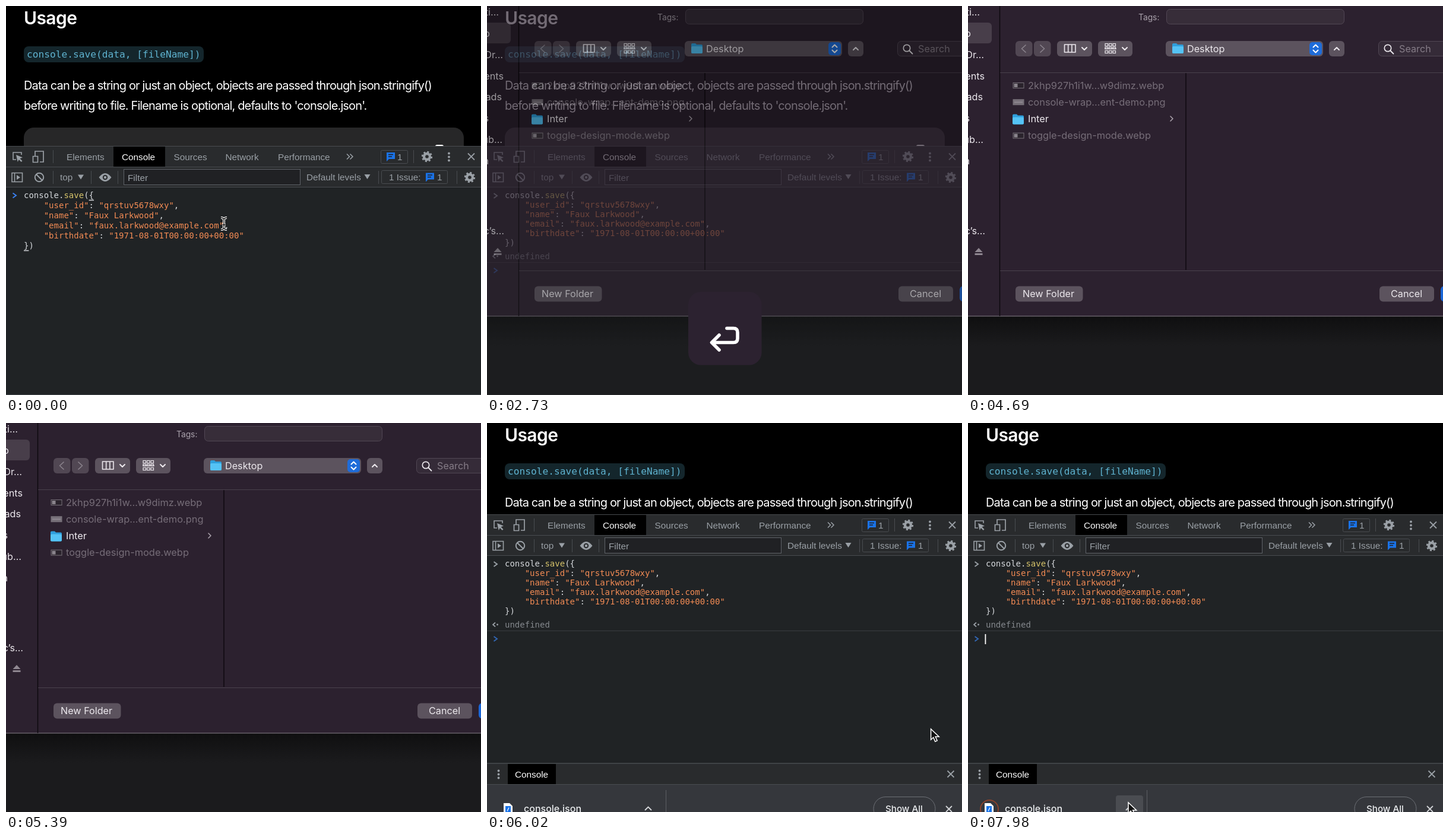
Write an HTML page that moves like this. It is 800 px wide and 656 px high and loops after 8.05 s.

```html
<!DOCTYPE html>
<html lang="en">
<head>
<meta charset="utf-8">
<title>console.save demo</title>
<style>
html, body { margin: 0; width: 100%; height: 100%; overflow: hidden; background: #000; }
svg { display: block; }
text { white-space: pre; }
.page { font-family: Inter, sans-serif; }
.ui { font-family: "Liberation Sans", Arial, sans-serif; font-size: 15.3px; }
.mono { font-family: "DejaVu Sans Mono", monospace; font-size: 14px; }
.mac { font-family: Inter, sans-serif; font-size: 16.2px; }
</style>
</head>
<body>
<svg id="stage" width="800" height="656" viewBox="0 0 800 656"></svg>
<script>
const LOOP = 8050, STEP = 70;
const GREY = '#9aa0a6', EDGE = '#494c50', ORANGE = '#f28b54', LIGHT = '#d5d8dc', BLUE = '#1a73e8';

// Markup helpers
const text = (x, y, s, fill, cls, more = '') =>
  `<text x="${x}" y="${y}" fill="${fill}" class="${cls}" ${more}>${s}</text>`;
const rect = (x, y, w, h, fill, more = '') =>
  `<rect x="${x}" y="${y}" width="${w}" height="${h}" fill="${fill}" ${more}/>`;
const line = (d, stroke, w = 1, more = '') =>
  `<path d="${d}" fill="none" stroke="${stroke}" stroke-width="${w}" ${more}/>`;
const shape = (d, fill, more = '') => `<path d="${d}" fill="${fill}" ${more}/>`;
const circle = (x, y, r, fill, more = '') => `<circle cx="${x}" cy="${y}" r="${r}" fill="${fill}" ${more}/>`;
const group = (id, body, more = '') => `<g id="${id}" ${more}>${body}</g>`;
const round = 'stroke-linecap="round" stroke-linejoin="round"';

const gear = (x, y) =>
  circle(x, y, 5, 'none', `stroke="${GREY}" stroke-width="4.4"`) +
  circle(x, y, 7.7, 'none', `stroke="${GREY}" stroke-width="3" stroke-dasharray="3 3.05"`);
const cross = (x, y) => line(`M${x - 5.5} ${y - 5.5}l11 11m0 -11l-11 11`, GREY, 1.8);
const dots = (x, y) => [-6, 0, 6].map(d => circle(x, y + d, 1.9, GREY)).join('');
const note = (x, y) =>
  shape(`M${x} ${y}h14v11h-10l-4 4z`, BLUE) +
  line(`M${x + 3} ${y + 3.5}h8m-8 3.5h6`, '#202124', 1.4);
const down = (x, y) => shape(`M${x - 5} ${y - 4}h10l-5 8z`, GREY);
const bar = (x, y) => line(`M${x} ${y - 11}v22`, EDGE);

function page() {
  return rect(0, 0, 800, 656, '#000') +
    text(30, 31, 'Usage', '#fff', 'page', 'font-size="30" font-weight="600" letter-spacing="-.02em"') +
    rect(30, 68, 303, 27, '#14262c', 'rx="8"') +
    text(35, 87, 'console.save(data, [fileName])', '#5fb3d0', 'mono', 'style="font-size:16.2px"') +
    ['Data can be a string or just an object, objects are passed through json.stringify()',
      "before writing to file. Filename is optional, defaults to 'console.json'."]
      .map((s, i) => text(30, 141 + i * 33.5, s, '#fff', 'page', 'font-size="20" letter-spacing="-.0435em"')).join('') +
    rect(30, 205, 741, 60, '#272728', 'rx="17"') +
    rect(723, 234, 14, 10, '#fff', 'rx="3"');
}

function toolbar() {
  const tabs = [[102, 'Elements'], [195, 'Console'], [282.5, 'Sources'], [369.5, 'Network'], [458, 'Performance']];
  return rect(0, 236, 800, 69, '#292b2d') +
    rect(181, 237, 87, 34, '#000') +
    line('M0 236.5H800M0 271.5H800M0 305.5H800', EDGE) +
    line('M17 259h-5v-12h14v4', GREY, 1.6) +
    shape('M17 251l11 4.5l-4.5 1.8l4 4l-1.8 1.8l-4 -4l-2 4z', GREY) +
    line('M49 253v-8h14v18h-6', GREY, 1.7) + line('M45.5 253.5h8v10h-8z', GREY, 1.7) +
    bar(79.5, 254) +
    tabs.map(([x, s]) => text(x, 259.5, s, s === 'Console' ? '#fff' : GREY, 'ui')).join('') +
    line('M574 249.5l4.5 4.5l-4.5 4.5m5.5 -9l4.5 4.5l-4.5 4.5', GREY, 1.5) +
    rect(631.5, 243.5, 45, 22, 'none', `stroke="${EDGE}" rx="2"`) + note(641, 247) +
    text(659, 259.5, '1', GREY, 'ui') +
    bar(686.5, 254) + gear(709, 254) + dots(746, 254.5) + cross(783.5, 254) +
    // second row
    line('M10 281.5h17.5v15h-17.5zM14.5 281v16', GREY, 1.6) + shape('M18 285l6 4l-6 4z', GREY) +
    circle(56, 289, 7.2, 'none', `stroke="${GREY}" stroke-width="2"`) + line('M51 284l10 10', GREY, 2) +
    bar(79.5, 289) + text(91, 294, 'top', GREY, 'ui') + down(126, 288.5) + bar(143.5, 289) +
    shape('M156.5 289q10.500 -14 21 0q-10.500 14 -21 0z', GREY) +
    circle(167, 289, 3.2, GREY, 'stroke="#292b2d" stroke-width="2"') +
    bar(188.5, 289) +
    rect(198.5, 275.5, 297, 26, '#202124', 'stroke="#5f6368"') +
    text(205, 294.5, 'Filter', GREY, 'ui') +
    text(506, 294, 'Default levels', GREY, 'ui') + down(608.5, 288) + bar(627.500, 289) +
    rect(632.5, 277.5, 111, 22, 'none', `stroke="${EDGE}" rx="2"`) +
    text(645, 294, '1 Issue:', GREY, 'ui') + note(707, 281.5) + text(726, 294, '1', GREY, 'ui') +
    bar(759.5, 289) + gear(781, 289);
}

function snippet(leading) {
  const rows = [
    ['user_id', 'qrstuv5678wxy', ','], ['name', 'Faux Larkwood', ','],
    ['email', 'faux.larkwood@example.com', ','], ['birthdate', '1971-08-01T00:00:00+00:00', '']];
  const span = s => `<tspan fill="${ORANGE}">"${s}"</tspan>`;
  return text(30, 324, 'console.<tspan fill="#d6c36a">save</tspan>({', LIGHT, 'mono') +
    rows.map(([k, v, end], i) =>
      text(63.7, 324 + leading * (i + 1), `${span(k)}: ${span(v)}${end}`, LIGHT, 'mono')).join('') +
    text(30, 324 + leading * 5, '})', LIGHT, 'mono');
}

const prompt = (y, color) => line(`M11.500 ${y - 4}l5.500 4l-5.500 4`, color, 1.9);
const pairMarks = (id, a, b) => group(id, line(`M${a} 327.5h8.4M${b} 412.5h8.4`, LIGHT, 1.3));

function panel() {
  const editing = prompt(319.5, '#3b82f6') + snippet(17) +
    pairMarks('braces', 139.6, 30) + pairMarks('parens', 131.2, 38.4);
  const done = prompt(320, GREY) + snippet(16) +
    line('M14 418.500l-4 3.500l4 3.500', GREY, 1.7) + circle(17.5, 422, 1.4, GREY) +
    text(30, 426.5, 'undefined', '#85898e', 'mono') +
    line('M0 432.5H800', '#3a3d40') + prompt(446, '#3267b5') +
    group('caret', rect(28.5, 438, 1.8, 17, '#fff'));
  const shelf = rect(0, 691, 800, 60, '#35373c') + line('M0 691.5H800', EDGE) +
    group('hover', rect(249, 710, 46, 46, '#4a4c51', 'rx="4"') +
      circle(36, 733, 15, 'none', 'stroke="#8c432c" stroke-width="2"')) +
    shape('M28 723h10l5 5v17h-15z', '#fff') + rect(31, 728, 9, 11, BLUE) +
    line('M37 730.5l-3 6', '#fff', 1.3) +
    text(62, 738, 'console.json', '#eceef0', 'mac', 'style="font-size:16px" font-weight="500"') +
    line('M266 735l5.500 -5.500l5.500 5.500', '#d5d7da', 1.8) + line('M301.5 701v50', '#5d6065') +
    rect(651, 712.5, 104, 40, 'none', 'rx="20" stroke="#6d7076"') +
    text(671, 738, 'Show All', '#eceef0', 'mac', 'style="font-size:15.2px" font-weight="500"') +
    line('M773 728l10 10m0 -10l-10 10', '#d0d2d5', 1.8);
  const drawer = rect(0, 656, 800, 35, '#292b2d') + rect(35, 657, 81, 34, '#000') +
    line('M0 656H800', EDGE, 1.4) + dots(19.5, 674.5) +
    text(47, 679.5, 'Console', '#fff', 'ui') + cross(781, 674);
  return rect(0, 305, 800, 351, '#202325') + toolbar() +
    group('editing', editing) + group('done', done) + drawer + shelf;
}

function dialog() {
  const bg = '#2c212f', key = '#5c535e', rule = '#4a414d', white = '#ece8ed', dim = '#766d78';
  const button = (x, y, w, fill = key) => rect(x, y, w, 26, fill, 'rx="6"');
  const chev = (x, y, dx, dy, color = white) => line(`M${x - dx} ${y - dy}l${dx} ${dy}`, color, 2, round);
  const vee = (x, y, h) => line(`M${x - 4} ${y - h}l4 ${2 * h}l4 ${-2 * h}`, white, 2, round);
  const folder = (x, y) => shape(`M${x} ${y + 2}q0 -2 2 -2h5l2 2h8q2 0 2 2v11q0 2 -2 2h-15q-2 0 -2 -2z`, '#2f9fdc') +
    rect(x, y + 5, 19, 12, '#55c3f5', 'rx="2"');
  const side = [['ti…', 20, 10], ['p', 5, 46], ['Dr…', 27, 82], ['ents', 28, 118], ['ads', 25, 153],
    ['s', 3, 189], ['ub…', 26, 225], ['n', 3, 261], ['c’s…', 29, 379]];
  const files = ['2khp927h1i1w…w9dimz.webp', 'console-wrap…ent-demo.png', 'Inter', 'toggle-design-mode.webp'];
  let s = rect(0, 0, 800, 656, '#1b1b1d') + rect(0, 523, 800, 50, 'url(#shade)') +
    rect(0, 0, 800, 523, bg) + line('M0 523H800', '#665f69', 1.3) +
    rect(-10, 28, 50, 35, '#483e4a', 'rx="6"') +
    side.map(([w, x, y]) => text(x, y + 5.5, w, white, 'mac', 'text-anchor="end"')).join('') +
    shape('M11.500 415l6.500 -7l6.500 7zM11.500 417h13v3h-13z', '#8f8791') +
    line('M53.5 0V523M367 113V445', '#0c080d', 1.4) +
    line('M54 112.500H800M54 446.5H800', rule);
  s += text(287, 24, 'Tags:', '#aaa2ac', 'mac', 'style="font-size:13.8px"') +
    rect(334.5, 5.5, 299, 25, '#372d39', 'rx="6" stroke="#514754"') +
    button(80, 59, 28.5, '#51475300'.slice(0, 7)) + button(111, 59, 28.5, '#514753') +
    line('M97 66l-6.500 6l6.500 6M122 66l6.500 6l-6.500 6', '#8b838d', 1.7, round) +
    button(150, 59, 59) + line('M162.500 65h18.500v13h-18.500zM168.700 65v13M174.900 65v13', white, 1.6, round) +
    line('M192 70l4 4l4 -4M260 70l4 4l4 -4', white, 2, round) + button(219, 59, 58);
  for (let r = 0; r < 3; r++) for (let c = 0; c < 3; c++)
    s += rect(231 + c * 6.5, 63.500 + r * 6, 4.500, r === 1 ? 3 : 4, 'none', `stroke="${white}" stroke-width="1.2"`);
  s += line('M230 72H250', white, 1.2) + line('M260 70l4 4l4 -4', white, 2, round) +
    button(333, 59, 265) + folder(344, 63) + text(369, 77.5, 'Desktop', white, 'mac') +
    rect(575, 61, 21, 22, '#1f6cd9', 'rx="5"') +
    line('M581.500 69.500l4 -4l4 4M581.500 74.500l4 4l4 -4', '#fff', 2, round) +
    button(608, 59, 26) + line('M617 74l4 -4l4 4', white, 2, round) +
    rect(691.5, 59.5, 130, 25, '#352b38', 'rx="6" stroke="#514754"') +
    circle(707, 71, 5.7, 'none', `stroke="${white}" stroke-width="1.7"`) +
    line('M711.500 75.500l5 5', white, 1.8, round) + text(726, 78, 'Search', '#857c87', 'mac');
  s += files.map((name, i) => {
    const y = 134 + i * 28.2, open = name === 'Inter';
    const icon = open ? folder(75, y - 8) :
      rect(76, y - 4.500, 18, 9, i === 1 ? '#777079' : '#2a232c', 'stroke="#777079"') +
      (i === 1 ? line(`M78 ${y}h14`, '#a29ca4') : rect(77.5, y - 3, 6, 6, '#8b858d'));
    return icon + text(101, y + 5.8, name, open ? white : dim, 'mac', 'style="font-size:16.4px"');
  }).join('') + line('M341 186l4 4l-4 4', '#aaa2ac', 1.6, round);
  return s + button(80, 472.5, 113.5) + text(92, 490.5, 'New Folder', white, 'mac') +
    button(693, 472.5, 92) + text(712, 490.5, 'Cancel', white, 'mac') +
    button(796, 472.5, 60, '#1b66d6');
}

const keyHint = rect(339, 482, 123.500, 123.500, '#2c2230', 'rx="21"') +
  line('M404 543.500h11q7 0 7 7v10q0 7 -7 7h-36M391 555l-12.500 12.500l12.500 12.500', '#fff', 5.6, round);

const cursors =
  group('arrow', shape('M0 0v18l4.200 -3.800l3 7l3.400 -1.500l-3 -6.700h6z', '#111', 'stroke="#fff" stroke-width="1.5"')) +
  group('beam', ['#fff', '#111'].map((c, i) =>
    line('M-5 -10q4 0 5 2.500q1 -2.500 5 -2.500M-5 10q4 0 5 -2.500q1 2.500 5 2.500M0 -8v16M-2.500 2h5', c, i ? 1.4 : 4)).join('')) +
  group('resize', shape('M-5 0l7 -7v4h6v6h-6v4z', '#111', 'stroke="#fff" stroke-width="1.5"'));

const stage = document.getElementById('stage');
stage.innerHTML =
  `<defs><linearGradient id="shade" x1="0" y1="0" x2="0" y2="1">
    <stop offset="0" stop-color="#0f0f10"/><stop offset="1" stop-color="#1b1b1d"/></linearGradient></defs>` +
  page() + group('panel', panel()) + group('dialog', dialog()) + group('key', keyHint) +
  circle(205.5, 438.5, 40, 'none', 'id="ring" stroke="#2657a6" stroke-width="1.5"') +
  group('cursor', cursors);

// Timeline
const mousePath = [[0, 367, 367], [770, 367, 367], [1540, 205, 437], [3640, 205, 437], [4410, 815, 480],
  [5530, 815, 490], [5670, 796, 495], [6300, 713, 531], [6860, 713, 531], [7770, 270, 640], [LOOP, 270, 640]];
const el = id => document.getElementById(id);
const ramp = (t, a, b) => Math.min(1, Math.max(0, (t - a) / (b - a)));
const smooth = k => k * k * (3 - 2 * k);
const show = (id, on) => { el(id).style.display = on ? '' : 'none'; };
const fade = (id, k) => { show(id, k > 0); el(id).setAttribute('opacity', k); };

function mouseAt(t) {
  const i = mousePath.findIndex(p => p[0] > t);
  const [t0, x0, y0] = mousePath[i - 1], [t1, x1, y1] = mousePath[i];
  const k = smooth(ramp(t, t0, t1));
  return [x0 + (x1 - x0) * k, y0 + (y1 - y0) * k];
}

function draw(t) {
  const ran = t >= 2450;
  show('editing', !ran);
  show('done', ran);
  show('braces', t < 420);
  show('parens', t >= 420);
  show('caret', t >= 6550 && (t - 6550) % 1000 < 500);
  show('hover', t >= 7700);
  el('panel').setAttribute('transform', `translate(0 ${-82 * smooth(ramp(t, 5740, 5950))})`);

  fade('dialog', ramp(t, 2590, 2800) * (1 - ramp(t, 5460, 5600)));
  fade('key', ramp(t, 2310, 2450) * (1 - ramp(t, 3500, 3780)));
  fade('ring', ramp(t, 1540, 1610) * (1 - ramp(t, 1750, 2030)));
  el('ring').setAttribute('r', 31 + 9 * ramp(t, 1540, 1750));

  const [x, y] = mouseAt(t);
  const kind = t < 1540 && y < 412 ? 'beam' : t >= 5530 && t < 5740 ? 'resize' : 'arrow';
  for (const id of ['arrow', 'beam', 'resize']) show(id, id === kind);
  show('cursor', t < 2380 || t >= 3640);
  el('cursor').setAttribute('transform', `translate(${x} ${y})`);
}

const start = performance.now();
function tick() {
  const t = (performance.now() - start) % LOOP;
  draw(Math.floor(t / STEP) * STEP);
  requestAnimationFrame(tick);
}
draw(0);
requestAnimationFrame(tick);
</script>
</body>
</html>
```
